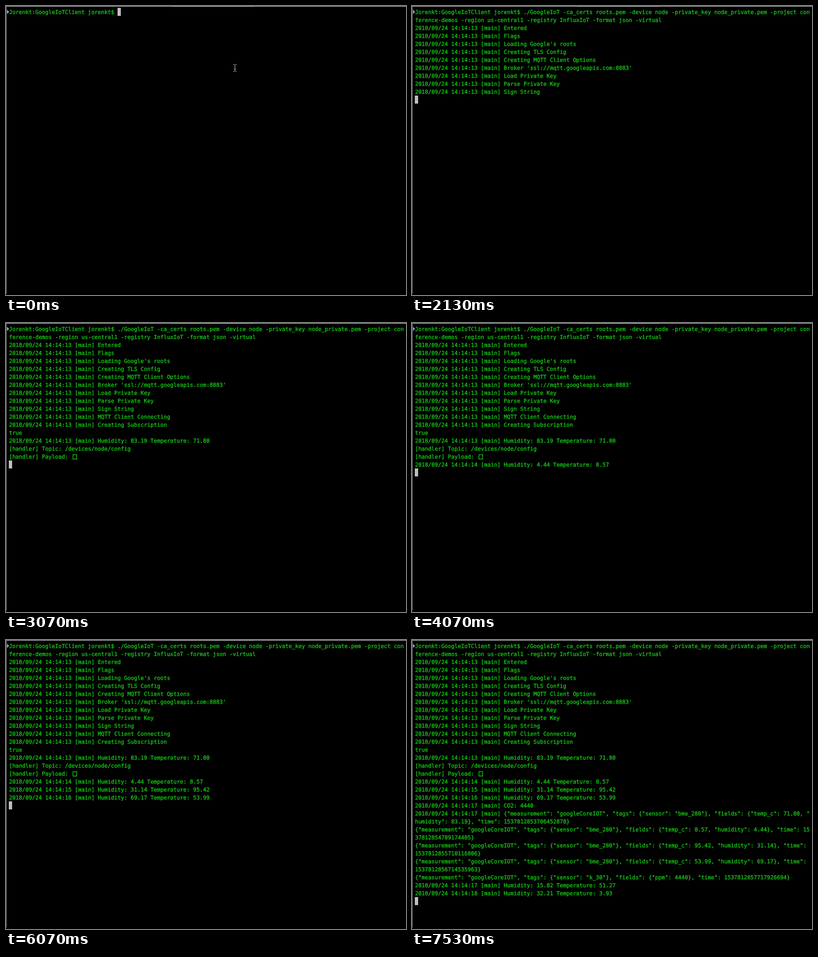
An HTML page that plays this animation: 850x616 px, repeating every 8 s.

```html
<!DOCTYPE html>
<html lang="en">
<head>
<meta charset="utf-8">
<title>Terminal session</title>
<style>
  html, body { margin: 0; width: 100%; height: 100%; overflow: hidden; background: #000; }
  svg { display: block; width: 850px; height: 616px; }
  text {
    font: 11.627px "DejaVu Sans Mono", monospace;
    fill: #14bc14; stroke: #14bc14; stroke-width: .5px;
    white-space: pre; text-rendering: geometricPrecision;
  }
</style>
</head>
<body>
<svg viewBox="0 0 850 616">
  <rect width="850" height="616"/>
  <path d="M0 0H850V1H1V613H0Z" fill="#a0a0a0"/>
  <rect y="1" width="850" height="1" fill="#484848"/>
  <rect x="352" width="174" height="1" fill="#c8c8c8"/>
  <path d="M2 8L6.500 12.500L2 17Z" fill="#7fb2ee"/>
  <g id="rows"></g>
  <path id="joint" d="M143 280.500h7M143 290h7" stroke="#14bc14" stroke-width="1.300" fill="none"/>
  <rect id="caret" width="7" height="17" fill="#bfbfbf"/>
  <path id="pointer" d="M483 124.500h2l1.500 1.500l1.500-1.500h2M486.500 126v12M483 139.500h2l1.500-1.500l1.500 1.500h2M484.500 134.500h4"
        stroke="#c8c8c8" fill="none"/>
</svg>
<script>
const LOOP = 8000, COLS = 120, CELL = 7, LINE = 17, LEFT = 6, TOP = 4;
const PAYLOAD_TIME = 2530;

const log = (sec, msg) => `2018/09/24 14:14:${sec} [main] ${msg}\n`;
const climate = (sec, hum, temp) => log(sec, `Humidity: ${hum} Temperature: ${temp}`);
const record = (sensor, fields, time) =>
  `{"measurement": "googleCoreIOT", "tags": {"sensor": "${sensor}"}, "fields": {${fields}}, "time": ${time}}\n`;
const bme = (temp, hum, time) => record("bme_280", `"temp_c": ${temp}, "humidity": ${hum}`, time);

const startup = ["Entered", "Flags", "Loading Google's roots", "Creating TLS Config",
  "Creating MQTT Client Options", "Broker 'ssl://mqtt.googleapis.com:8883'",
  "Load Private Key", "Parse Private Key", "Sign String"];

// Each entry appends its text to the screen at the given time.
const output = [
  [0, "Jorenkt:GoogleIoTClient jorenkt$ "],
  [600, "./GoogleIoT -ca_certs roots.pem -device node -private_key node_private.pem " +
    "-project conference-demos -region us-central1 -registry InfluxIoT -format json -virtual"],
  [2070, "\n" + startup.map(msg => log(13, msg)).join("")],
  [2200, log(13, "MQTT Client Connecting")],
  [PAYLOAD_TIME, log(13, "Creating Subscription") + "true\n" + climate(13, "83.19", "71.80") +
    "[handler] Topic: /devices/node/config\n[handler] Payload: []\n"],
  [3530, climate(14, "4.44", "8.57")],
  [4530, climate(15, "31.14", "95.42")],
  [5530, climate(16, "69.17", "53.99")],
  [6530, log(17, "CO2: 4440") +
    log(17, bme("71.80", "83.19", "1537812853706452878").trimEnd()) +
    bme("8.57", "4.44", "1537812854709174405") +
    bme("95.42", "31.14", "1537812855710116806") +
    bme("53.99", "69.17", "1537812856714535963") +
    record("k_30", '"ppm": 4440', "1537812857717926694") +
    climate(17, "15.82", "51.27")],
  [7530, climate(18, "32.21", "3.93")]
];

const byId = id => document.getElementById(id);
const rows = byId("rows"), caret = byId("caret"), pointer = byId("pointer"), joint = byId("joint");
const show = (el, on) => el.setAttribute("visibility", on ? "visible" : "hidden");
let shown = "";

function wrap(text) {
  return text.split("\n").flatMap(line => {
    const parts = [];
    for (let i = 0; i === 0 || i < line.length; i += COLS) parts.push(line.slice(i, i + COLS));
    return parts;
  });
}

function drawScreen(text) {
  const lines = wrap(text);
  rows.replaceChildren(...lines.map((line, i) => {
    const el = document.createElementNS("http://www.w3.org/2000/svg", "text");
    el.setAttribute("x", LEFT + 0.4);
    el.setAttribute("y", TOP + 13 + i * LINE);
    el.textContent = line;
    return el;
  }));
  caret.setAttribute("x", LEFT + lines.at(-1).length * CELL);
  caret.setAttribute("y", TOP + (lines.length - 1) * LINE);
}

function render(t) {
  const text = output.filter(([at]) => at <= t).map(([, part]) => part).join("");
  if (text !== shown) drawScreen(shown = text);
  show(pointer, t < 600);
  show(joint, t >= PAYLOAD_TIME);
}

const start = performance.now();
function tick() {
  render((performance.now() - start) % LOOP);
  requestAnimationFrame(tick);
}
tick();
</script>
</body>
</html>
```
